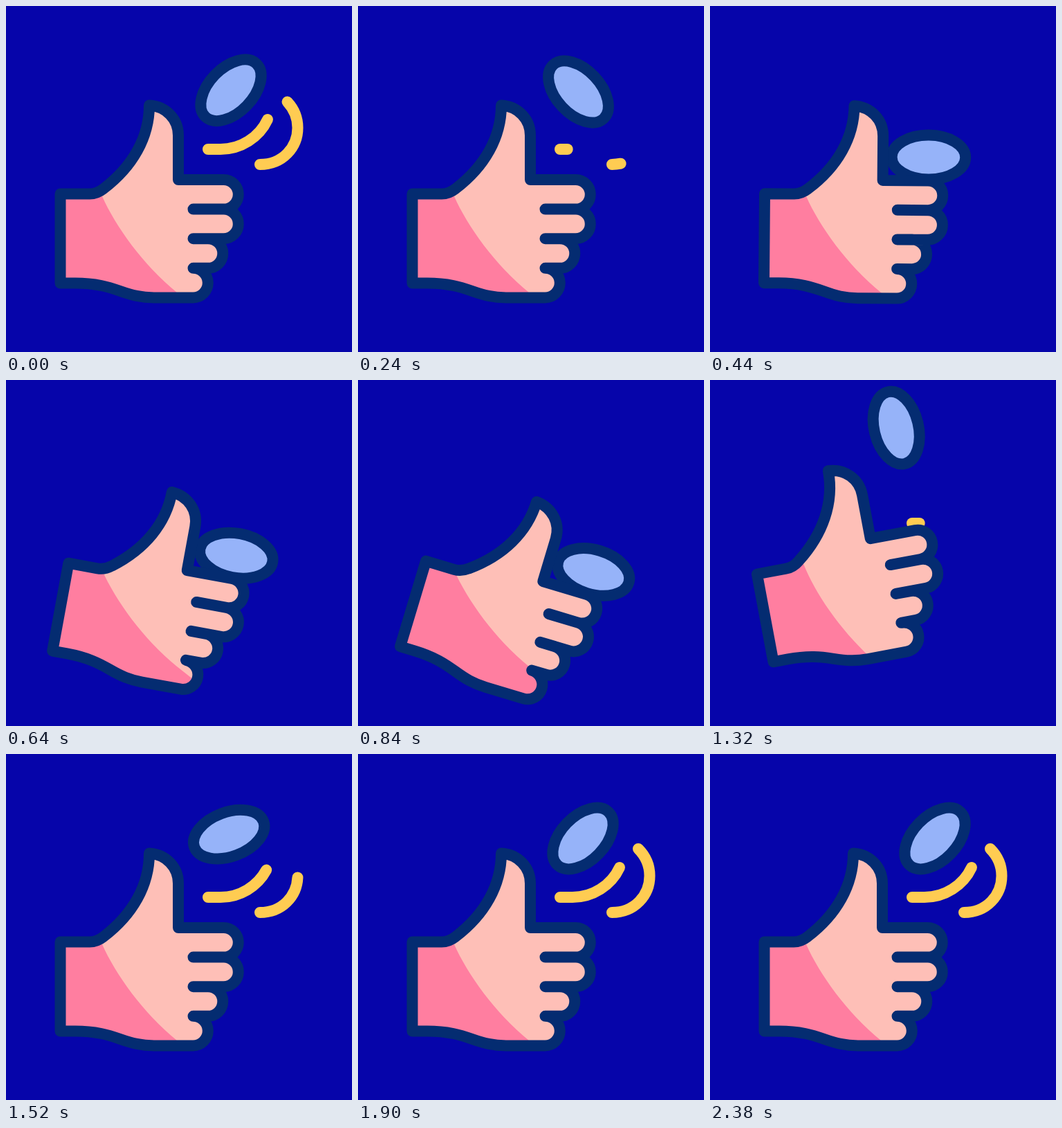
Write an HTML page with a canvas that moves like this. It is 500 px wide and 500 px high and loops after 2400 ms.

```html
<!DOCTYPE html>
<html>
<head>
<meta charset="utf-8">
<title>Coin toss</title>
<style>
  html, body { margin: 0; height: 100%; overflow: hidden; background: #0605aa; }
  canvas { display: block; width: 100vmin; height: 100vmin; }
</style>
</head>
<body>
<canvas width="500" height="500"></canvas>
<script>
const LOOP = 2400;
const PIVOT = [122, 333.3];
const NAVY = '#042c71', SKIN = '#febfb7', SHADE = '#ff7ea0', COIN = '#96b3f9', YELLOW = '#ffcc52';

const ctx = document.querySelector('canvas').getContext('2d');

const hand = new Path2D(`M78.5 271.5H121C130 271.5 136 268 141 264C183 232 207 190 207 143.5
  C231 145 249 163 249 187V251H314.5a21.3 21.3 0 0 1 0 42.6H270.5H314.5a21.3 21.3 0 0 1 0 42.6H270.5
  H292a21.3 21.3 0 0 1 0 42.6H270.5a21.3 21.3 0 0 1 0 42.6H214C195 421.4 182 418 165 412
  C148 406 130 400.5 100 400.5H78.5Z`);
// The shade stays fixed on the stage while the hand turns through it.
const shade = new Path2D('M116 220L139 275C158 318 198 374 247 414L300 456V500H0V220Z');
const trails = [
  { path: new Path2D('M292 207h18C339 207 366 190 378 164'), length: 106, start: 1260, end: 1570 },
  { path: new Path2D('M367 229C400 229 421.5 204 421.5 176C421.5 161 416 148 405 137'), length: 126, start: 1340, end: 1640 },
];

const smooth = p => p * p * (3 - 2 * p);
const easeIn = p => p * p;
const easeOut = p => p * (2 - p);

// Keys are [time, value, easing towards this key].
function track(t, keys) {
  const i = keys.findIndex(key => t < key[0]);
  if (i < 0) return keys[keys.length - 1][1];
  if (i === 0) return keys[0][1];
  const [t0, from] = keys[i - 1];
  const [t1, to, ease = smooth] = keys[i];
  return from + (to - from) * ease((t - t0) / (t1 - t0));
}

const handAngle = t => track(t, [[400, 0], [820, 17], [1210, -17], [1475, 0]]);
const coinX = t => track(t, [[0, 325], [400, 315], [1300, 315], [1640, 325]]);
const coinY = t => track(t, [[0, 122], [130, 105, easeOut], [400, 217, easeIn],
  [1070, 217], [1290, 100], [1640, 122]]);
const coinAngle = t => track(t, [[0, -226], [400, -360], [1070, -360], [1640, -586]]);

function turn(degrees, x, y) {
  ctx.translate(x, y);
  ctx.rotate(degrees * Math.PI / 180);
}

function drawTrail({ path, length, start, end }, t) {
  const shown = track(t, [[0, 1], [300, 0], [start, 0], [end, 1]]);
  if (shown <= 0) return;
  ctx.setLineDash(shown < 1 ? [length * shown, 999] : []);
  ctx.strokeStyle = YELLOW;
  ctx.stroke(path);
  ctx.setLineDash([]);
}

function drawCoin(t) {
  ctx.save();
  turn(coinAngle(t), coinX(t), coinY(t));
  ctx.beginPath();
  ctx.ellipse(0, 0, 53.3, 32, 0, 0, 2 * Math.PI);
  ctx.fillStyle = COIN;
  ctx.fill();
  ctx.stroke();
  ctx.restore();
}

function drawHand() {
  ctx.fillStyle = SKIN;
  ctx.fill(hand);
  ctx.save();
  ctx.clip(hand);
  ctx.resetTransform();
  ctx.fillStyle = SHADE;
  ctx.fill(shade);
  ctx.restore();
  ctx.stroke(hand);
}

function draw(now) {
  const t = now % LOOP;
  ctx.resetTransform();
  ctx.fillStyle = '#0605aa';
  ctx.fillRect(0, 0, 500, 500);
  ctx.lineWidth = 16;
  ctx.lineCap = ctx.lineJoin = 'round';
  trails.forEach(trail => drawTrail(trail, t));

  ctx.strokeStyle = NAVY;
  turn(handAngle(t), ...PIVOT);
  ctx.translate(-PIVOT[0], -PIVOT[1]);
  drawCoin(t);
  drawHand();
}

const began = performance.now();
(function frame() {
  draw(performance.now() - began);
  requestAnimationFrame(frame);
})();
</script>
</body>
</html>
```
